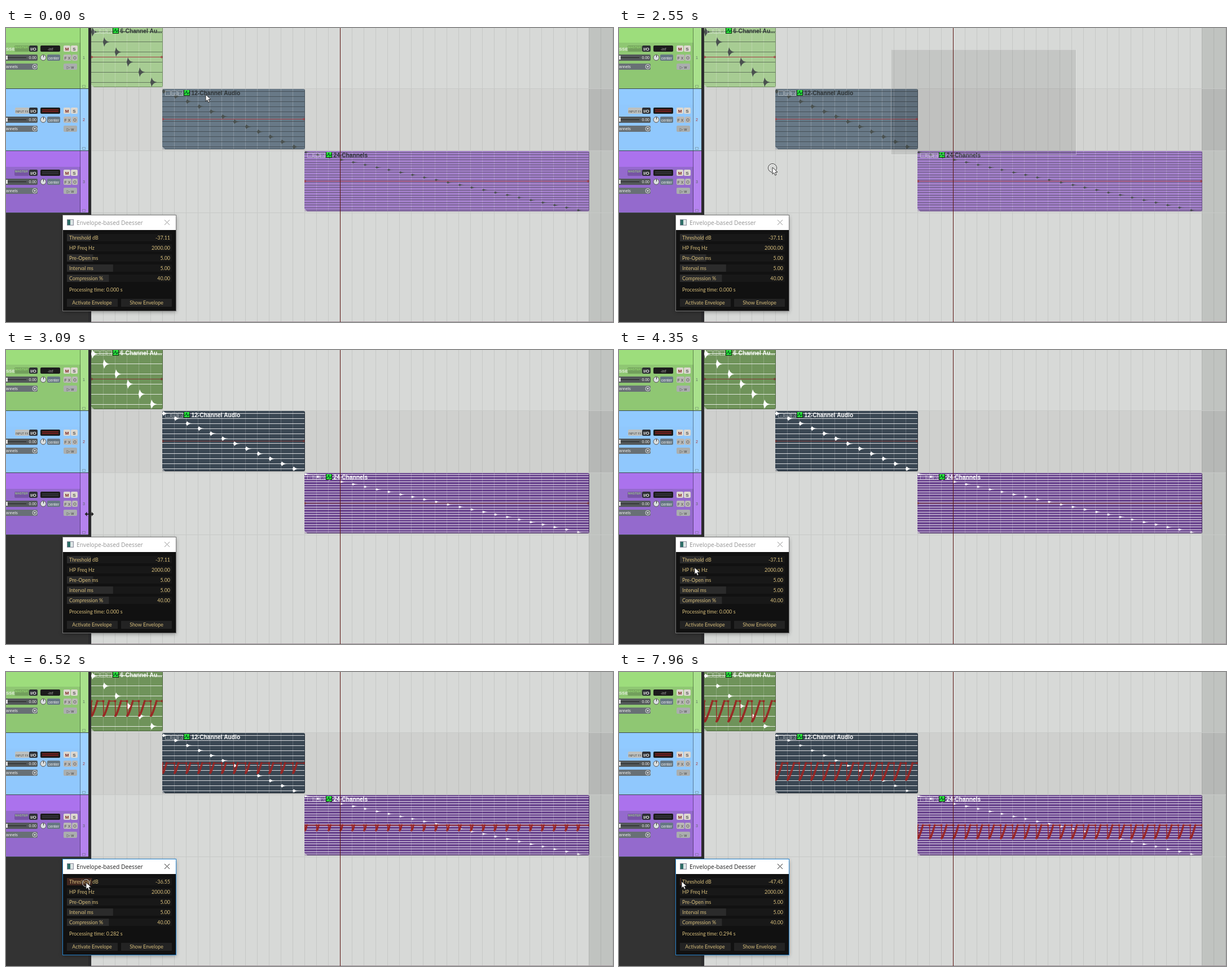
Recreate the animation shown at these times as an HTML page with a canvas. Size 1076x521 px, loop 8000 ms.

```html
<!DOCTYPE html>
<html lang="en">
<head>
<meta charset="utf-8">
<title>Deesser envelope demo</title>
<style>
html, body { margin: 0; width: 100%; height: 100%; overflow: hidden; }
canvas { display: block; }
</style>
</head>
<body>
<canvas id="stage" width="1076" height="521"></canvas>
<script>
const c = document.getElementById('stage').getContext('2d');
const LOOP = 8000, STEP = 180, HIT = 21, ROW = 110;
const DRAG = 2010, PICK = 3090, FOCUS = 4530, PROCESS = 5790;
const SANS = '"Liberation Sans", Arial, sans-serif';
const TITLE = '10.3px "Open Sans", "Noto Sans", sans-serif';
const LABEL = '8.9px Lato, "Open Sans", sans-serif';
const SMALL = '7px ' + SANS, BOLD = 'bold 8px ' + SANS;
const GOLD = '#d6bd7b';

// Key points: time, then the values reached at that time.
const POINTER = [
  [0, 354, 118], [720, 658, 240], [1260, 578, 225],
  [DRAG, 800, 45], [2370, 482, 224], [2550, 272, 247], [2730, 151, 265], [2910, 145, 264],
  [3810, 118, 398], [4890, 150, 373], [5430, 163, 373], [6520, 142, 373], [7960, 111, 371]
];
const THRESHOLD = [[4890, -37.11], [5430, -32.86], [6520, -36.55], [7960, -47.45]];

const TRACKS = [['#9ddd7c', '#8fc773'], ['#91caff', '#90c8fd'], ['#ab72ed', '#946acd']];
const ITEMS = [
  ['6-Channel Au...', '#a7cc93', '#6f935a'],
  ['12-Channel Audio', '#687987', '#3a4753'],
  ['24-Channels', '#a27fc9', '#6b468f']
];

function at(keys, t) {
  const i = keys.findIndex(k => k[0] > t);
  if (i === 0) return keys[0].slice(1);
  if (i < 0) return keys[keys.length - 1].slice(1);
  const a = keys[i - 1], b = keys[i], u = (t - a[0]) / (b[0] - a[0]);
  return a.slice(1).map((v, j) => v + (b[j + 1] - v) * u);
}

// The picture advances in fixed steps, with two pauses.
function snap(t) {
  const [start, end] = t < DRAG ? [0, 1260] : t < 6340 ? [DRAG, 5970] : [6340, 7960];
  return Math.min(end, start + Math.floor((t - start) / STEP) * STEP);
}

function rect(x, y, w, h, color) { c.fillStyle = color; c.fillRect(x, y, w, h); }

function frame(x, y, w, h, color) {
  c.strokeStyle = color; c.lineWidth = 1;
  c.strokeRect(x + .5, y + .5, w - 1, h - 1);
}

function text(s, x, y, font, color, align = 'left') {
  c.font = font; c.fillStyle = color; c.textAlign = align;
  c.fillText(s, x, y);
}

function trace(points) {
  c.beginPath();
  points.forEach(p => c.lineTo(p[0], p[1]));
}

function line(points, color, width = 1) {
  trace(points);
  c.strokeStyle = color; c.lineWidth = width; c.stroke();
}

function shape(points, color) {
  trace(points);
  c.fillStyle = color; c.fill();
}

function ring(x, y, r, color, width = 1) {
  c.beginPath(); c.arc(x, y, r, 0, 7);
  c.strokeStyle = color; c.lineWidth = width; c.stroke();
}

function button(x, y, w, fill, label = '', color = '#444', font = SMALL) {
  c.beginPath(); c.roundRect(x, y, w, 11, 2);
  c.fillStyle = fill; c.fill();
  text(label, x + w / 2, y + 8.5, font, color, 'center');
}

function arrange(picked) {
  rect(0, 0, 1076, 521, '#d7d9d7');
  rect(151, 108, 882, 109, picked ? '#cfd0ce' : '#d3d4d2');
  rect(1033, 0, 43, 521, '#c0c3c0');
  rect(1033, 108, 43, 109, '#b6b8b6');
  for (let x = 151; x < 1076; x += HIT) rect(x, 0, 1, 521, 'rgba(0,0,0,.08)');
  for (let y = 107; y < 400; y += ROW) rect(151, y, 925, 1, '#c7c9c7');
  rect(151, 520, 925, 1, '#a4979f');
}

function track([head, body], i) {
  const y = i * ROW, top = i ? y - 2 : 0, h = y + 107 - top;
  rect(0, top, 145, h, body);
  rect(0, top, 145, y + 26 - top, head);
  rect(132, top, 14, h, head);
  rect(132, top, 14, h, 'rgba(255,255,255,.12)');
  rect(131, top, 1, h, 'rgba(0,0,0,.4)');
  rect(0, y + 107, 145, 1, '#3c4a4a');

  if (i === 1) button(16, y + 31, 25, '#bdc0be', 'INPUT FX', '#444', '5px ' + SANS);
  else {
    button(15, y + 31, 26, 'rgba(0,0,0,.2)');
    text('MASTER', 39, y + 36, '5.5px ' + SANS, '#a5f07c', 'right');
    if (!i) text('SSE', 0, y + 40, BOLD, '#e8eee4');
  }
  button(41, y + 31, 15, '#2d3034', 'I/O', '#eee', BOLD);
  button(61, y + 31, 35, '#1c1c1c', i ? '' : '-inf', '#aaa');
  if (i) for (const dy of [34, 37]) rect(64, y + dy, 29, 2, i === 1 ? '#761f1c' : '#34343a');
  button(102, y + 31, 12, '#ddd8d0', 'M', '#7e2722', BOLD);
  button(115, y + 31, 12, '#ddd8d0', 'S', '#555', BOLD);

  button(-3, y + 47, 59, '#53585a');
  rect(0, y + 52, 36, 1, '#222');
  rect(0, y + 49, 3, 7, '#ddd');
  text('0.00', 54, y + 55, SMALL, '#eee', 'right');
  ring(66, y + 52.5, 2.5, '#d8dddf', 5);
  ring(66, y + 52.5, 5, '#555');
  rect(66, y + 48, 1, 4, '#333');
  button(73, y + 47, 23, '#667783', 'center', '#f0f0f0');
  button(102, y + 47, 14, '#bab9b6', 'F X');
  button(117, y + 47, 10, '#bab9b6');
  ring(122, y + 53, 2.3, '#555', .8);

  button(-3, y + 63, 59, '#687075');
  text('annels', 0, y + 71, SMALL, '#f2f2f2');
  ring(51, y + 68.5, 4, '#ddd');
  shape([[49, y + 67.5], [53, y + 67.5], [51, y + 70.5]], '#eee');
  button(102, y + 63, 24, '#aaaeae', '▷ w');
  text(i + 1, 138, y + 55, SMALL, i === 1 ? '#a33' : '#586860', 'center');
  frame(135, y + 101, 6, 5, 'rgba(80,100,90,.4)');
}

// A sharp attack with a decaying tail, mirrored about its lane.
function wave(x, y, height, color) {
  const upper = [], lower = [];
  for (let d = 0; d <= 11; d++) {
    const a = height * (d < 2 ? .1 + d * .4 : Math.exp((2 - d) / 3));
    upper.push([x + d, y - a]);
    lower.unshift([x + d, y + a]);
  }
  shape([...upper, ...lower], color);
}

function envelope(x, count, mid, depth) {
  const run = depth * .38, dots = Math.max(3, Math.round(depth / 2.8)), points = [];
  for (let i = 0; i < count; i++) {
    const left = x + i * HIT + 1;
    points.push([left - .5, mid]);
    for (let j = 0; j <= dots; j++) {
      const u = j / dots;
      points.push([left + run * u, mid + depth * (1 - u ** 1.3)]);
    }
  }
  points.push([x + count * HIT, mid]);
  line(points, '#9a2422', 1.4);
  points.forEach(p => ring(p[0], p[1], 1.5, '#9a2422', 1.2));
}

function item([name, plain, picked], i, isPicked, amount) {
  const count = 6 << i, x = 25 + (126 << i), top = i * ROW - 2, w = count * HIT, h = 107;
  const lane = h / count, mid = top + h / 2, processed = amount !== null;
  const pale = isPicked ? 'rgba(255,255,255,.45)' : 'rgba(235,240,240,.5)';
  c.save();
  c.beginPath(); c.roundRect(x, top, w + 1, h, 3); c.clip();
  rect(x, top, w + 1, h, isPicked ? picked : plain);
  for (let k = 1; k < count; k++) rect(x + k * HIT, top, 1, h, 'rgba(255,255,255,.2)');
  const height = Math.max(1.9, lane * .47 * (processed ? .75 - .25 * amount : 1));
  for (let k = 0; k < count; k++) {
    const y = top + lane * (k + .5);
    rect(x, Math.round(y - .5), w, 1, isPicked ? 'rgba(255,255,255,.8)' : 'rgba(45,50,50,.55)');
    wave(x + k * HIT, y, height, isPicked ? '#fff' : '#4a514f');
  }
  if (processed) envelope(x, count, mid, Math.max(1, 26 - 8.5 * i + (10 + 2 * i) * amount));
  else {
    const red = isPicked ? '#7b3433' : '#a53c43';
    rect(x, mid - .5, w, 1, red);
    for (const end of [x + 1, x + w - 1]) ring(end, mid, 1.6, red);
  }
  rect(x, top + h - 1, w, 1, 'rgba(0,0,0,.35)');
  rect(x + w, top, 1, h, 'rgba(0,0,0,.3)');
  shape([[x, top + h], [x, top + h - 5], [x + 5, top + h]], 'rgba(225,225,225,.6)');
  c.restore();

  const y = top + 2;
  ['▫', 'M', 'FX'].forEach((s, j) => {
    frame(x + 5 + j * 11, y + 1, 10, 9, pale);
    text(s, x + 10 + j * 11, y + 8.5, SMALL, pale, 'center');
  });
  rect(x + 38, y, 11, 10, '#0a2a0a');
  rect(x + 39, y, 9, 9, '#2be03a');
  line([[x + 39, y + 6], [x + 41, y + 6], [x + 43, y + 2], [x + 45, y + 7], [x + 48, y + 4]], '#052', 1.2);
  text(name, x + 51.5, y + 9, 'bold 10.2px ' + SANS, isPicked ? '#fff' : '#2c3234');
}

function dialog(active, threshold, seconds) {
  const ink = active ? '#222' : '#949494';
  c.save();
  c.shadowColor = 'rgba(0,0,0,.4)'; c.shadowBlur = 7; c.shadowOffsetY = 2;
  rect(101, 332, 200, 169, '#111');
  c.restore();
  rect(101, 332, 200, 26, '#fff');
  frame(100, 331, 202, 171, active ? '#2785d0' : '#777');
  frame(108, 339, 12, 11, '#889');
  rect(109, 340, 5, 9, '#2f6f68');
  rect(114, 340, 5, 9, '#dde5e5');
  text('Envelope-based Deesser', 125, 349, TITLE, ink);
  line([[281, 340], [290, 349]], ink);
  line([[290, 340], [281, 349]], ink);

  [
    ['Threshold dB', threshold, 1 + threshold / 48], ['HP Freq Hz', 2000, 0],
    ['Pre-Open ms', 5, .25], ['Interval ms', 5, .44], ['Compression %', 40, .4]
  ].forEach(([name, value, fill], i) => {
    const y = 365 + i * 18;
    rect(108, y, 186, 13, '#181818');
    rect(108, y, 186 * fill, 13, active && !i ? '#40271f' : '#2b2b2b');
    text(name, 112, y + 10, LABEL, GOLD);
    text(value.toFixed(2), 291, y + 10, LABEL, GOLD, 'right');
  });
  text(`Processing time: ${seconds.toFixed(3)} s`, 112, 467, LABEL, GOLD);
  ['Activate Envelope', 'Show Envelope'].forEach((s, i) => {
    rect(108 + i * 96, 480, 90, 14, '#232323');
    text(s, 152.5 + i * 96.5, 490, LABEL, GOLD, 'center');
  });
}

function pointer(x, y, pressed) {
  if (pressed) {
    ring(x, y + 1, 7.5, 'rgba(20,20,20,.85)');
    ring(x, y + 1, 6.5, 'rgba(255,255,255,.8)');
  }
  const arrow = [[0, 0], [0, 12], [2.8, 9.4], [4.8, 14], [7, 13], [5, 8.6], [9, 8.4], [0, 0]]
    .map(p => [x + p[0], y + p[1]]);
  shape(arrow, '#fff');
  line(arrow, '#222', .9);
}

function resizer(x, y) {
  rect(x - 5, y - 1, 10, 2, '#222');
  for (const side of [-1, 1]) {
    shape([[x + side * 8, y], [x + side * 4, y - 4], [x + side * 4, y + 4]], '#222');
  }
}

function draw(now) {
  const t = snap(now % LOOP), picked = t >= PICK, dragging = t >= DRAG && !picked;
  const amount = t < PROCESS ? null : Math.min(1, (t - 6520) / 720);
  const [x, y] = at(POINTER, t);
  arrange(picked);
  ITEMS.forEach((it, i) => item(it, i, picked, amount));
  if (dragging) {
    // The selection trails the pointer by one step.
    const [mx, my] = at(POINTER, Math.max(DRAG, t - STEP));
    rect(mx, 38, 810 - mx, my - 38, 'rgba(0,0,0,.09)');
    frame(mx, 38, 811 - mx, my - 37, 'rgba(235,235,235,.4)');
  }
  rect(592, 0, 1, 521, '#5a1410');
  rect(0, 0, 151, 521, '#333');
  TRACKS.forEach(track);
  rect(146, 0, 5, 521, '#2b2b2d');
  dialog(t >= FOCUS, at(THRESHOLD, t)[0], amount === null ? 0 : .282 + .012 * amount);
  if (t === PICK) resizer(x + 8, y);
  else pointer(x, y, dragging || (t >= FOCUS && t < 7960));
}

const start = performance.now();
function tick() {
  draw(performance.now() - start);
  requestAnimationFrame(tick);
}
tick();
</script>
</body>
</html>
```
